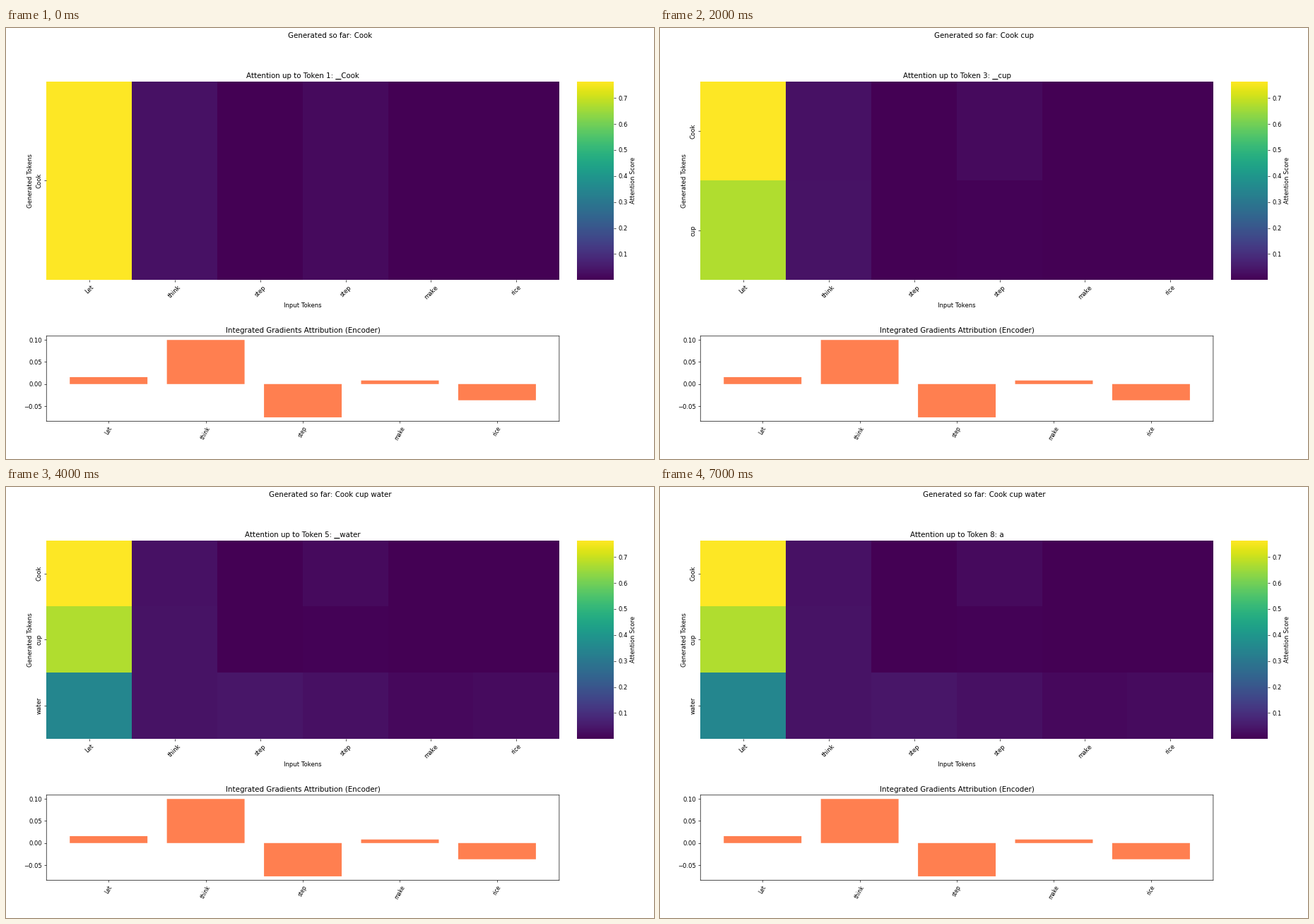
These frames come from a looping animation (917x611 px, 8 s). A matplotlib script:

```python
import matplotlib.pyplot as plt
import numpy as np
from matplotlib.animation import FuncAnimation
from matplotlib.cm import ScalarMappable
from matplotlib.colors import Normalize

W, H = 917, 611
DPI = W / 15
plt.rcParams.update({"font.family": "DejaVu Sans", "path.snap": False})

BLOCK = "\u2581"
STEPS = [BLOCK + "Cook", BLOCK + "1", BLOCK + "cup", BLOCK + "of",
         BLOCK + "water", BLOCK + "in", BLOCK, "a"]
INPUTS = ["Let", "think", "step", "step", "make", "rice"]

# Each kept word: the step at which it appears and its attention, as a share of the top score
ROWS = [
    ("Cook", 0, [1.0, 0.047, 0.002, 0.024, 0.001, 0.0]),
    ("cup", 2, [0.88, 0.049, 0.002, 0.005, 0.0, 0.0]),
    ("water", 4, [0.46, 0.051, 0.056, 0.041, 0.022, 0.028]),
]
NORM = Normalize(0.0003, 0.764)

WORDS = ["Let", "think", "step", "make", "rice"]
SCORES = [0.0157, 0.0997, -0.0752, 0.0081, -0.0366]

fig = plt.figure(figsize=((W + 0.001) / DPI, (H + 0.001) / DPI), dpi=DPI,
                 facecolor="white")
grid = fig.add_gridspec(2, 2, width_ratios=[14, 1], height_ratios=[7, 3])
heat = fig.add_subplot(grid[0, 0])
cax = fig.add_subplot(grid[0, 1])
bars = fig.add_subplot(grid[1, 0])
heading = fig.suptitle("", y=0.99)

cbar = fig.colorbar(ScalarMappable(NORM, "viridis"), cax=cax, label="Attention Score")
cbar.outline.set_linewidth(0)

bars.bar(range(len(WORDS)), SCORES, color="coral")
bars.set_xticks(range(len(WORDS)), WORDS, rotation=60, fontsize=9)
bars.set_title("Integrated Gradients Attribution (Encoder)")


def update(step):
    shown = [(word, shares) for word, start, shares in ROWS if start <= step]
    words = [word for word, _ in shown]
    scores = np.array([shares for _, shares in shown]) * NORM.vmax

    heat.clear()
    heat.pcolormesh(scores, cmap="viridis", norm=NORM)
    heat.set(xlim=(0, len(INPUTS)), ylim=(len(words), 0),
             xlabel="Input Tokens", ylabel="Generated Tokens")
    heat.spines[:].set_visible(False)
    heat.set_xticks(np.arange(len(INPUTS)) + 0.5, INPUTS, rotation=45)
    heat.set_yticks(np.arange(len(words)) + 0.5, words, rotation=90, va="center")
    heat.set_title(f"Attention up to Token {step + 1}: {STEPS[step]}")
    heading.set_text("Generated so far: " + " ".join(words))
    return []


# Lay out at a finer resolution, where text sizes are measured more exactly
update(0)
fig.set_dpi(100)
fig.tight_layout(pad=3)
fig.set_dpi(DPI)

anim = FuncAnimation(fig, update, frames=len(STEPS), interval=1000,
                     init_func=lambda: update(0), repeat=True, repeat_delay=0)
plt.show()
```
